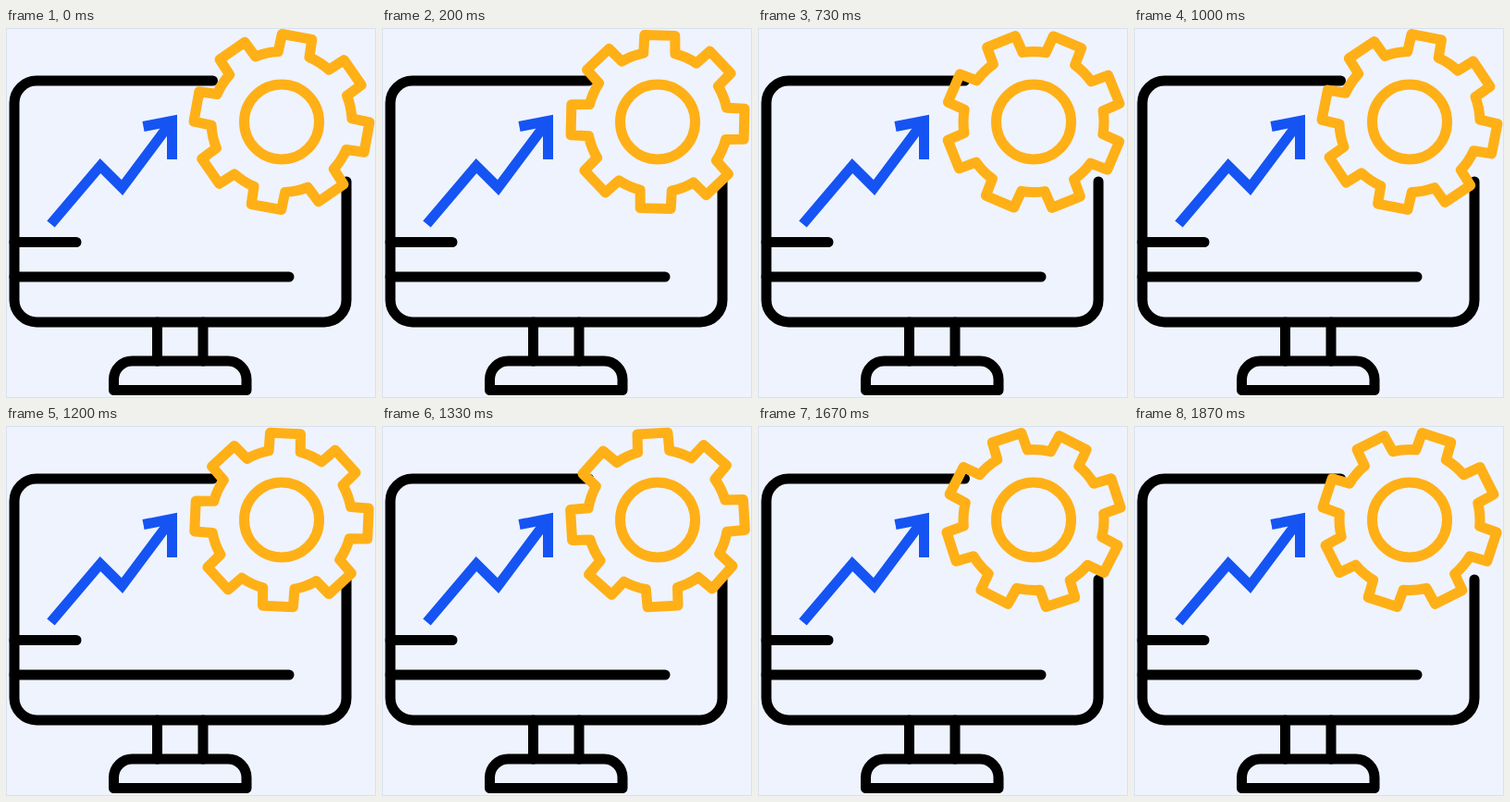
An HTML page for the animation above (1940 ms loop, 400 by 400 pixels).

```html
<!DOCTYPE html>
<html lang="en">
<head>
<meta charset="utf-8">
<title>Monitor with turning gear</title>
<style>
  html, body { margin: 0; width: 100%; height: 100%; overflow: hidden; background: #eef3fd; }
  svg { display: block; width: 100vw; height: 100vh; }
</style>
</head>
<body>
<svg viewBox="0 0 400 400" fill="none" stroke-width="11">
  <rect width="400" height="400" fill="#eef3fd" stroke="none"/>
  <rect x=".5" y=".5" width="399" height="399" stroke="#d9e1f0" stroke-width="1"/>
  <g stroke="#000" stroke-linecap="round" stroke-linejoin="round">
    <path d="M223.5 57H33A24 24 0 0 0 9 81V294A24 24 0 0 0 33 318H344A24 24 0 0 0 368 294V166"/>
    <path d="M9 231.5H76M9 269H306"/>
    <path d="M163.5 318V360M213 318V360"/>
    <path d="M116.5 391.5V380A20 20 0 0 1 136.5 360H240A20 20 0 0 1 260 380V391.5Z"/>
  </g>
  <g stroke="#1554f3" stroke-miterlimit="8">
    <path d="M48.5 212L102 149L125.5 172.5L179 101"/>
    <path d="M148.5 106.5L179.5 100.5V142"/>
  </g>
  <g stroke="#ffb017" stroke-linejoin="round" transform="translate(298 101.5)">
    <circle r="40.5"/>
    <path id="gear"/>
  </g>
</svg>
<script>
  const LOOP = 1940, FPS = 15, LAST_STEP = 28;
  const START_ANGLE = 10.2, STEP_ANGLE = -2.93;
  const TEETH = 8, TIP = 95, ROOT = 76, TIP_HALF = 10, ROOT_HALF = 13;
  const gear = document.getElementById('gear');

  // Angles are in degrees, clockwise from the top.
  function polar(radius, degrees) {
    const a = degrees * Math.PI / 180;
    return `${(radius * Math.sin(a)).toFixed(2)} ${(-radius * Math.cos(a)).toFixed(2)}`;
  }

  function gearPath() {
    const pitch = 360 / TEETH;
    let d = `M${polar(ROOT, -ROOT_HALF)}`;
    for (let i = 0; i < TEETH; i++) {
      const mid = i * pitch;
      d += `L${polar(TIP, mid - TIP_HALF)}L${polar(TIP, mid + TIP_HALF)}`
         + `L${polar(ROOT, mid + ROOT_HALF)}`
         + `A${ROOT} ${ROOT} 0 0 1 ${polar(ROOT, mid + pitch - ROOT_HALF)}`;
    }
    return d + 'Z';
  }

  function render(ms) {
    const hundredths = Math.floor((ms % LOOP) / 10);
    const step = Math.min(LAST_STEP, Math.floor((hundredths + 0.4) * FPS / 100));
    gear.setAttribute('transform', `rotate(${START_ANGLE + STEP_ANGLE * step})`);
  }

  gear.setAttribute('d', gearPath());
  const start = performance.now();
  function tick() {
    render(performance.now() - start);
    requestAnimationFrame(tick);
  }
  tick();
</script>
</body>
</html>
```
